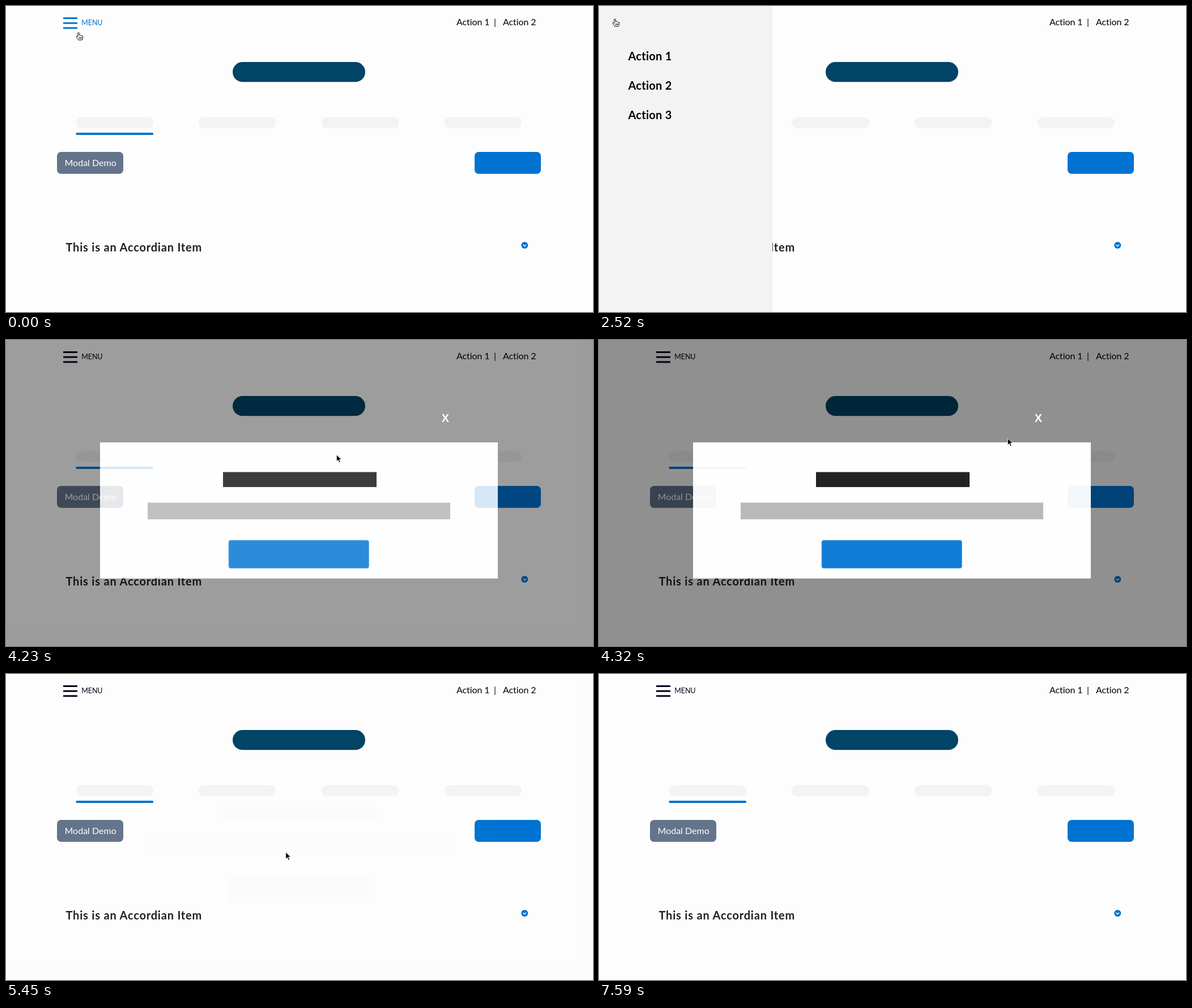
Recreate the animation shown at these times as an HTML page. Size 1036 by 541 pixels, loop 8400 ms.

```html
<!DOCTYPE html>
<html lang="en">
<head>
<meta charset="utf-8">
<title>Menu, modal and accordion demo</title>
<style>
  html, body { margin: 0; width: 100%; height: 100%; overflow: hidden; background: #fdfdfd; }
  svg { display: block; width: 1036px; height: 541px; font: 16px Lato, sans-serif; }
  .bold { font-weight: 700; font-size: 20px; }
  .link { letter-spacing: -.1px; }
  .accent { fill: #0073d2; }
  .pale { fill: #f3f3f3; }
  .close { font: 700 20px "Liberation Sans", sans-serif; }
</style>
</head>
<body>
<svg viewBox="0 0 1036 541">
  <defs>
    <clipPath id="clip"><rect id="clipRect" x="83" y="456" width="868" height="0"/></clipPath>
  </defs>

  <g id="menu">
    <g id="bars"></g>
    <text x="133.3" y="34" font-size="12.5" letter-spacing="-.1">MENU</text>
  </g>
  <text class="link" x="795" y="34">Action 1</text>
  <text x="861" y="34">|</text>
  <text class="link" x="877" y="34">Action 2</text>

  <rect x="400" y="99" width="234" height="35.3" rx="17.6" fill="#004466"/>
  <g id="tabs" class="pale"></g>
  <rect class="accent" x="123.5" y="224" width="136.5" height="4" rx="1.5"/>
  <rect x="90" y="258" width="117" height="38.7" rx="7" fill="#64748b"/>
  <text x="103.5" y="283" fill="#fff">Modal Demo</text>
  <rect class="accent" x="827" y="258" width="117" height="38.7" rx="7"/>

  <text class="bold" x="105.5" y="433.5" fill="#1c1f24" letter-spacing=".8">This is an Accordian Item</text>
  <circle class="accent" cx="915.3" cy="423" r="6"/>
  <path d="M912.5 422l2.8 2.7 2.8-2.7" fill="none" stroke="#fff" stroke-width="1.4"/>
  <g clip-path="url(#clip)">
    <rect x="83.5" y="456" width="866.5" height="54.6" fill="#ffc0cb"/>
    <text x="99" y="489" fill="#1c1f24">There are words inside of here!</text>
  </g>

  <g id="panel">
    <rect class="pale" width="306" height="541"/>
    <g id="links" class="bold" letter-spacing=".25"></g>
  </g>

  <g id="modal">
    <path d="M0 0h1036v541H0z" fill-opacity=".455"/>
    <text class="close" x="775.3" y="145" fill="#fff" text-anchor="middle">X</text>
    <rect x="166" y="181" width="702" height="240.6" fill="#fff"/>
    <rect x="383" y="233.5" width="271" height="26.5" fill="#181818"/>
    <rect x="250" y="287.5" width="534" height="29.5" fill="#b6b6b6"/>
    <rect x="393" y="354" width="247.5" height="49.5" rx="3.5" fill="#0576d5" stroke="#66aae6"/>
  </g>

  <g id="cursor">
    <path id="arrow" d="M0 0v12l2.8-2.6 2.1 4.8 2.1-.9-2.1-4.7h3.9z" stroke="#fff" stroke-width=".9"/>
    <path id="hand" fill="#fff" stroke="#000" stroke-linejoin="round"
      d="M-1.2 7.5V1.2Q-1.2 0 0 0T1.2 1.2V5Q1.5 4 2.5 4.2T3.6 5.2Q4.2 4.4 5 4.8T5.8 6Q7.6 5.2 7.6 7.2V9Q7.4 10.5 6.2 13H-.2Q-1.5 10.5-3.6 8.2-4.4 7-3.4 6.4-2.4 6.2-1.2 7.5zM1.4 8v2.8M3.3 8v2.8M5.1 8v2.8"/>
  </g>
</svg>
<script>
const LOOP = 8400;
const $ = id => document.getElementById(id);
const repeat = (id, count, markup) => {
  $(id).innerHTML = Array.from({ length: count }, (_, i) => markup(i)).join('');
};

repeat('bars', 3, i => `<rect x="101" y="${20 + i * 8.7}" width="25" height="3"/>`);
repeat('tabs', 4, i =>
  `<rect x="${123.5 + i * 216.7}" y="196.6" width="136.5" height="19.4" rx="9.7"/>`);
repeat('links', 3, i => `<text x="51.5" y="${95.5 + i * 52.2}">Action ${i + 1}</text>`);

// Places the pointer visits; it glides evenly between them and shows a hand on a target.
const stops = [
  { on: 'menu edge', arrive: 0, leave: 60, x: 128, y: 47 },
  { arrive: 260, leave: 410, x: 133, y: 57 },
  { on: 'menu', arrive: 580, leave: 990, x: 118, y: 32 },
  { on: 'panel corner', arrive: 1400, leave: 1850, x: 28, y: 23 },
  { on: 'link', arrive: 1960, leave: 2260, x: 116, y: 83 },
  { on: 'panel corner', arrive: 2520, leave: 2760, x: 28, y: 23 },
  { arrive: 3530, leave: 3730, x: 243, y: 302 },
  { on: 'modal button', arrive: 3930, leave: 3980, x: 195, y: 284 },
  { arrive: 4320, leave: 4320, x: 721, y: 174 },
  { on: 'close', arrive: 4550, leave: 4966, x: 775, y: 138 },
  { on: 'accordion', arrive: 5730, leave: 7300, x: 332, y: 417 },
  { arrive: 7560, leave: LOOP, x: 337, y: 560 }
];

function pointerAt(t) {
  const next = stops.findIndex(stop => stop.arrive > t);
  const from = stops.at(next < 0 ? -1 : next - 1);
  const to = next < 0 ? from : stops[next];
  const k = t < from.leave ? 0 : (t - from.leave) / (to.arrive - from.leave);
  const x = from.x + (to.x - from.x) * k, y = from.y + (to.y - from.y) * k;
  const overMenu = x > 101 && x < 170 && y < 50;
  return { x, y, overMenu, hand: overMenu && t < 990 || from.on && t < from.leave };
}

// cubic-bezier(.25, .1, .25, 1)
function ease(x) {
  if (x <= 0 || x >= 1) return x <= 0 ? 0 : 1;
  const bezier = (a, b, s) => 3 * a * s * (1 - s) ** 2 + 3 * b * s * s * (1 - s) + s ** 3;
  let lo = 0, hi = 1;
  for (let i = 0; i < 20; i++) {
    const mid = (lo + hi) / 2;
    if (bezier(.25, .25, mid) < x) lo = mid; else hi = mid;
  }
  return bezier(.1, 1, lo);
}

const openness = (t, open, close, duration) =>
  ease((t - open) / duration) - ease((t - close) / duration);

function draw(now) {
  const t = now % LOOP;
  const pointer = pointerAt(t);
  $('cursor').setAttribute('transform', `translate(${pointer.x} ${pointer.y})`);
  $('hand').style.display = pointer.hand ? '' : 'none';
  $('arrow').style.display = pointer.hand ? 'none' : '';
  $('menu').setAttribute('fill', pointer.overMenu ? '#0073d2' : '#00051a');
  $('panel').setAttribute('transform', `translate(${306 * (openness(t, 995, 2730, 500) - 1)} 0)`);
  $('modal').setAttribute('opacity', openness(t, 3960, 5000, 500));
  $('clipRect').setAttribute('height', 54.6 * openness(t, 6130, 7080, 220));
  requestAnimationFrame(() => draw(performance.now()));
}
draw(0);
</script>
</body>
</html>
```
